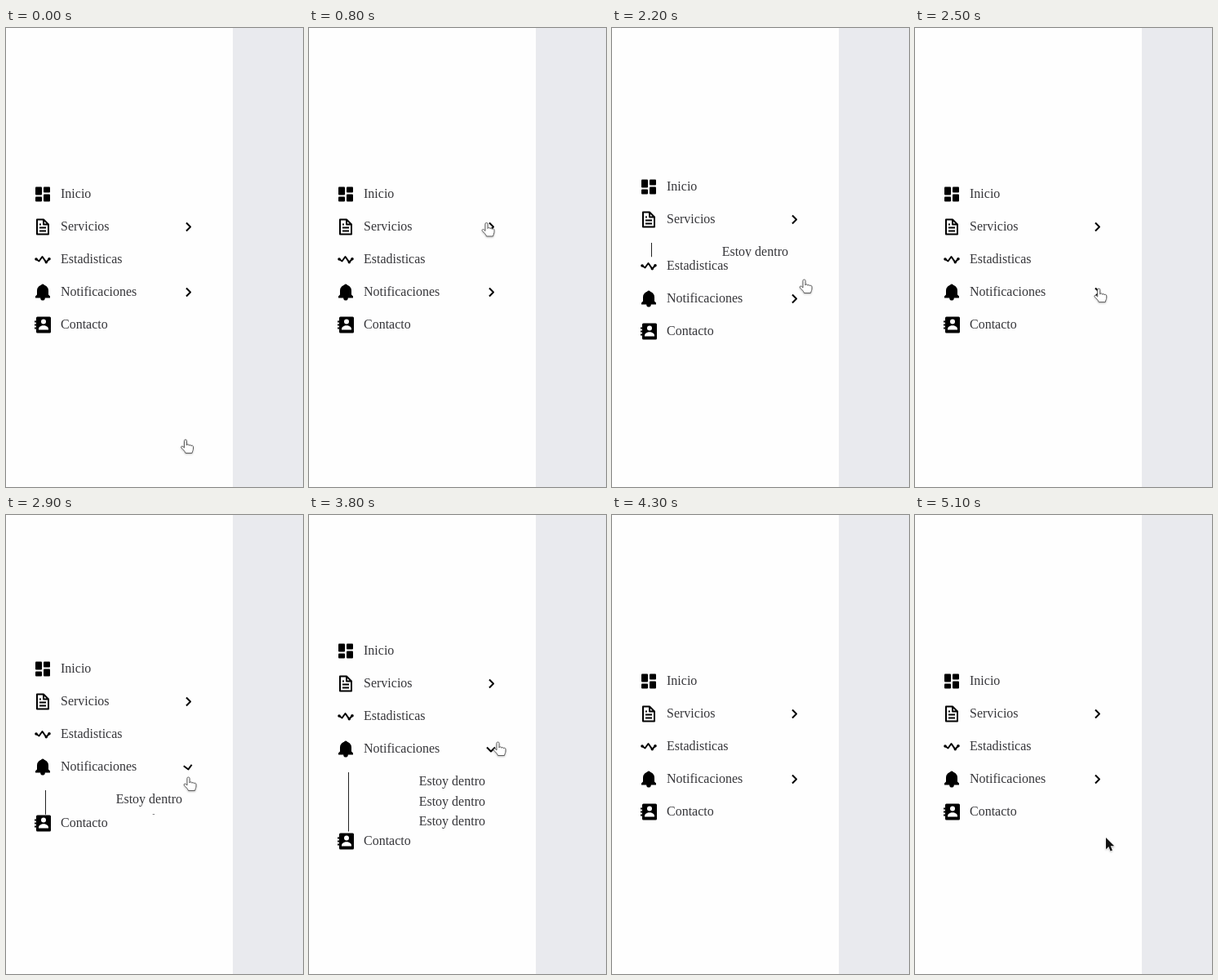
These frames come from a looping animation (364x562 px, 5.4 s). An HTML page:

```html
<!DOCTYPE html>
<html lang="es">
<head>
<meta charset="utf-8">
<title>Menú lateral</title>
<style>
  html, body { margin: 0; width: 100%; height: 100%; overflow: hidden; background: #e9eaee; }
  #stage { display: block; width: 364px; height: 562px; }
  text { font: 16px "Liberation Serif", "Times New Roman", serif; fill: #36363a; }
  .line { fill: none; stroke: #000; stroke-width: 2; stroke-linejoin: round; }
  .hand { fill: #fff; stroke: #5c5c5c; stroke-linejoin: round; }
  .arrow { fill: #111; stroke: #fff; paint-order: stroke; }
  #hand, #arrow { filter: drop-shadow(0 1px 1px rgba(0, 0, 0, .25)); }
</style>
</head>
<body>
<svg id="stage" viewBox="0 0 364 562">
  <rect width="364" height="562" fill="#e9eaee"/>
  <rect width="278" height="562" fill="#fefefe"/>
  <g id="menu"></g>
  <path id="hand" class="hand" d="M5 11V2.5a1.5 1.5 0 0 1 3 0V8c0-1.5 3-1.5 3 .3 0-1.2 2.5-1 2.5.6 0-1.2 2.5-1 2.5 1V12c0 2-1 3-1.5 5.5h-8C6 15 3 13 1.4 11c-1-1.4.8-2.6 2-1.5z"/>
  <path id="arrow" class="arrow" d="M0 0V14.2l3.3-3.1 2.3 5.3 2.3-1-2.2-5.1H10.2z"/>
</svg>
<script>
const LOOP = 5400, STEP = 100;
const ROW = 40, SUB = 24.2, FIRST = 202.6;

// the icons fill a box of 24 by 24
const box = (x, y, w, h, r = 1) => `<rect x="${x}" y="${y}" width="${w}" height="${h}" rx="${r}"/>`;
const dot = (x, y, r, fill = '#000') => `<circle cx="${x}" cy="${y}" r="${r}" fill="${fill}"/>`;
const line = d => `<path class="line" d="${d}"/>`;

const icons = {
  home: box(3, 3, 8, 10) + box(3, 15, 8, 6) + box(13, 3, 8, 7) + box(13, 12, 8, 9),
  file: line('M6 3h7l6 6v12H5V3zM13 3v6h6M8 9h2M8 13h8M8 17h8'),
  stats: line('M4 11.5L7.5 14 11.5 8.5 16.3 15.3 20 11.3') +
    dot(4, 11.5, 1.8) + dot(16.3, 15.3, 1.7) + dot(20, 11.3, 1.8),
  bell: '<path d="M5 15V10a7 7 0 0 1 14 0v5l2 2v2H3v-2z"/>' + dot(12, 4, 2) + dot(12, 19.2, 2.8),
  contact: box(4, 2, 18, 20, 1.5) + [7, 11, 15].map(y => box(2, y, 3, 2, 0)).join('') +
    dot(13, 8, 3, '#fff') + '<path fill="#fff" d="M7 18v-.7c0-6 12-6 12 0V18z"/>'
};
const chevron = line('M-2 -5L3 0-2 5').replace('round', 'miter');

// open and close are the times of the two clicks
const rows = [
  { label: 'Inicio', icon: 'home' },
  { label: 'Servicios', icon: 'file', subs: 2, open: 800, close: 2050 },
  { label: 'Estadisticas', icon: 'stats' },
  { label: 'Notificaciones', icon: 'bell', subs: 3, open: 2800, close: 3850 },
  { label: 'Contacto', icon: 'contact' }
];

// each move bows sideways on its way to x, y
const hand = {
  id: 'hand', show: 0, hide: 4300, x: 213.5, y: 503,
  moves: [
    { from: 0, to: 400, x: 211, y: 237.5, bow: 9 },
    { from: 1300, to: 1500, x: 216, y: 229 },
    { from: 1600, to: 1700, x: 216, y: 221 },
    { from: 1900, to: 2200, x: 229, y: 307 },
    { from: 2200, to: 2600, x: 217, y: 320 },
    { from: 2900, to: 3200, x: 225, y: 277 },
    { from: 3800, to: 4200, x: 222, y: 532, bow: 3 }
  ]
};
const arrow = {
  id: 'arrow', show: 4800, hide: LOOP, x: 236, y: 422,
  moves: [{ from: 4700, to: 5100, x: 234, y: 395, bow: 3 }]
};

const byId = id => document.getElementById(id);
const move = (el, x, y, extra = '') => el.setAttribute('transform', `translate(${x} ${y}) ${extra}`);
const clamp = p => Math.min(1, Math.max(0, p));

// cubic-bezier(.25, .1, .25, 1)
function ease(x) {
  if (x <= 0) return 0;
  if (x >= 1) return 1;
  let lo = 0, hi = 1, s;
  for (let i = 0; i < 24; i++) {
    s = (lo + hi) / 2;
    const bx = .75 * s * (1 - s) + s ** 3;
    if (bx < x) lo = s; else hi = s;
  }
  return .3 * s * (1 - s) ** 2 + 3 * s * s * (1 - s) + s ** 3;
}

const openness = (row, t, span) => ease((t - row.open) / span) - ease((t - row.close) / span);

function build(row) {
  const subs = Array.from({ length: row.subs || 0 }, (_, i) =>
    `<text x="216" y="${Math.round(16.4 + i * SUB)}" text-anchor="end">Estoy dentro</text>`).join('');
  const g = document.createElementNS('http://www.w3.org/2000/svg', 'g');
  g.innerHTML = `<g transform="translate(33 -11.5)">${icons[row.icon]}</g>
    <text x="67" y="5">${row.label}</text>` +
    (row.subs ? `<g class="chevron">${chevron}</g>
    <svg class="sub" y="29" width="278" height="0" overflow="hidden">
      <rect x="48" width="1" height="100" fill="#222"/>${subs}</svg>` : '');
  byId('menu').append(g);
  row.el = g;
  row.chevron = g.querySelector('.chevron');
  row.sub = g.querySelector('.sub');
}

function drawCursor(cursor, t) {
  const el = byId(cursor.id);
  let { x, y } = cursor;
  for (const m of cursor.moves) {
    const p = clamp((t - m.from) / (m.to - m.from));
    const q = (1 - Math.cos(Math.PI * p)) / 2;
    x += (m.x - x) * q + (m.bow || 0) * Math.sin(Math.PI * p);
    y += (m.y - y) * q;
  }
  el.style.display = t >= cursor.show && t < cursor.hide ? '' : 'none';
  move(el, x, y);
}

function draw(t) {
  const heights = rows.map(r => r.subs ? r.subs * SUB * openness(r, t, 400) : 0);
  let y = FIRST - heights.reduce((a, b) => a + b) / 2;
  rows.forEach((row, i) => {
    move(row.el, 0, Math.round(y));
    if (row.subs) {
      move(row.chevron, 223, .5, `rotate(${90 * openness(row, t, 160)})`);
      row.sub.setAttribute('height', Math.max(0, heights[i]));
      row.sub.style.display = heights[i] > .1 ? '' : 'none';
    }
    y += ROW + heights[i];
  });
  drawCursor(hand, t);
  drawCursor(arrow, t);
}

rows.forEach(build);
const start = performance.now();
function tick() {
  const t = (performance.now() - start) % LOOP;
  draw(Math.floor(t / STEP) * STEP);
  requestAnimationFrame(tick);
}
tick();
</script>
</body>
</html>
```
